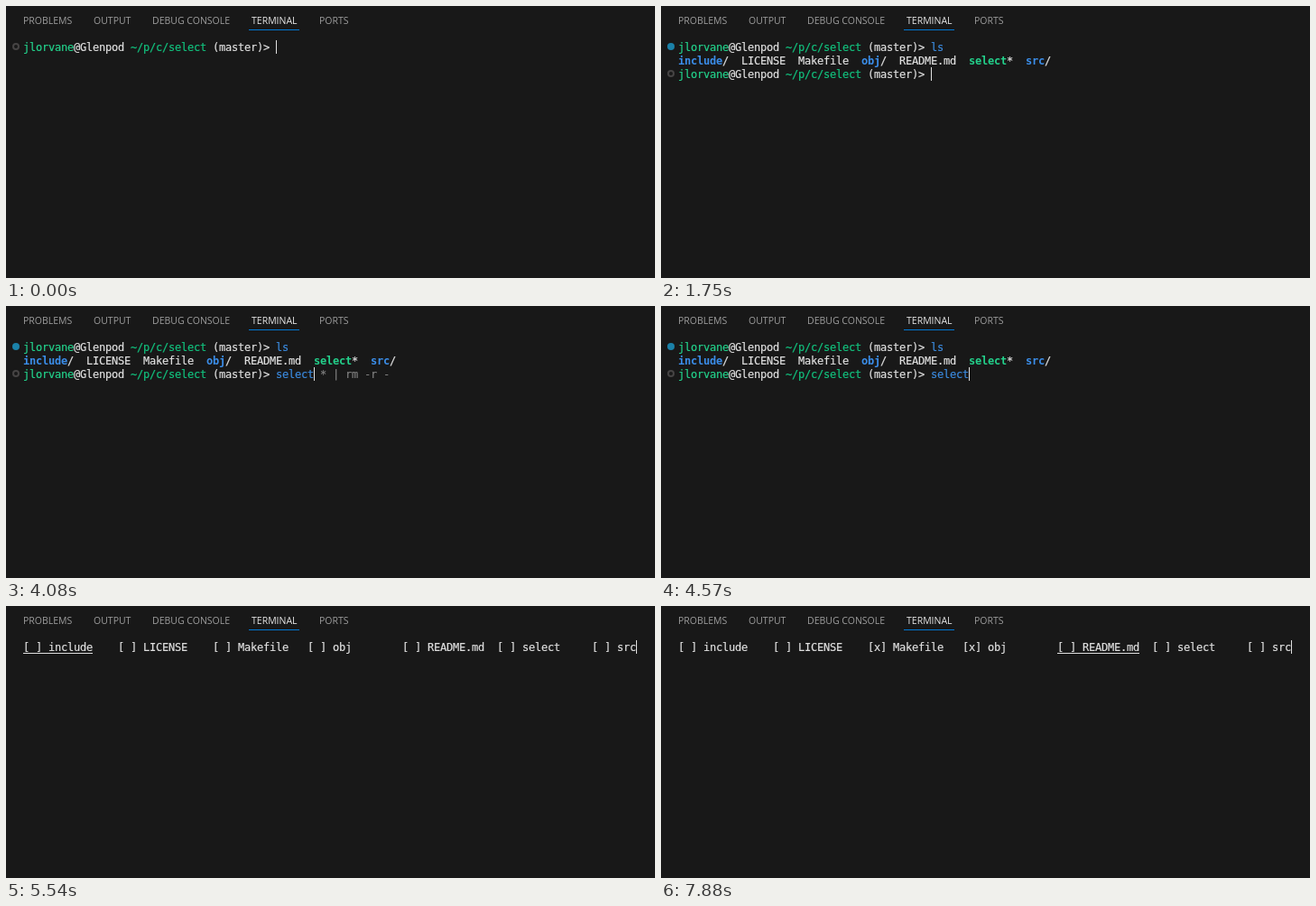
These frames come from a looping animation (719 px wide and 302 px high, 8000 ms). An HTML page:

```html
<!DOCTYPE html>
<html lang="en">
<head>
<meta charset="utf-8">
<title>Terminal file picker</title>
<style>
html, body { margin: 0; width: 100%; height: 100%; overflow: hidden; background: #181818; }
#stage { position: relative; width: 719px; height: 302px; overflow: hidden; background: #181818; }
#stage * { position: absolute; white-space: pre; }
.tab { top: 9px; color: #9d9d9d; font: 10.5px/15px "Open Sans", "Noto Sans", sans-serif; }
.tab.on { color: #e7e7e7; }
#bar { left: 269px; top: 26px; width: 56px; height: 1px; background: #0078d4; }
#screen { left: 19px; top: 38px; color: #e0e0e0;
  font: 12px/16px "DejaVu Sans Mono", monospace; letter-spacing: calc(7px - 1ch);
  -webkit-text-stroke: 0.2px; }
.user { color: #23d18b; }
.path { color: #12c27e; }
.cmd { color: #3b8ade; }
.glob { color: #29b8db; }
.bad { color: #f14c4c; }
.hint { color: #7f7f7f; }
.dir, .exe { font-weight: bold; -webkit-text-stroke: 0; }
.dir { color: #3b8eea; }
.exe { color: #23d18b; }
.caret { width: 1px; height: 15px; background: #e0e0e0; }
.line { height: 1px; background: #e0e0e0; }
.dot { left: -12px; width: 8px; height: 8px; border-radius: 50%; background: #1b81a8; }
.ring { left: -12px; width: 4px; height: 4px; border: 2px solid #464444; border-radius: 50%; }
</style>
</head>
<body>
<div id="stage">
  <span class="tab" style="left:19px">PROBLEMS</span>
  <span class="tab" style="left:97px">OUTPUT</span>
  <span class="tab" style="left:162px">DEBUG CONSOLE</span>
  <span class="tab on" style="left:272px">TERMINAL</span>
  <span class="tab" style="left:347px">PORTS</span>
  <div id="bar"></div>
  <div id="screen"></div>
</div>
<script>
const LOOP = 8000, CELL = 7, ROW = 15, INPUT = 40;
const screen = document.getElementById('screen');
const files = ['include', 'LICENSE', 'Makefile', 'obj', 'README.md', 'select', 'src'];
const kinds = { include: ['dir', '/'], obj: ['dir', '/'], src: ['dir', '/'], select: ['exe', '*'] };

function box(cls, style) {
  const el = document.createElement('span');
  el.className = cls;
  Object.assign(el.style, style);
  screen.append(el);
  return el;
}

// Writes text at a cell and returns the column after it.
function put(row, col, text, cls = '') {
  box(cls, { left: col * CELL + 'px', top: row * ROW + 'px' }).textContent = text;
  return col + text.length;
}

function caret(row, col) {
  box('caret', { left: col * CELL + 'px', top: row * ROW + 'px' });
}

function prompt(row, mark) {
  box(mark, { top: row * ROW + 3 + 'px' });
  put(row, 0, 'jlorvane', 'user');
  put(row, 8, '@Glenpod');
  put(row, 17, '~/p/c/select', 'path');
  put(row, 30, '(master)>');
}

// parts: [text, class] pairs before the caret; hint: greyed suggestion after it
function input(row, parts, hint) {
  let col = INPUT;
  for (const [text, cls] of parts) col = put(row, col, text, cls);
  if (hint) put(row, col, hint, 'hint');
  caret(row, col);
}

function listing() {
  let col = 0;
  for (const name of files) {
    const [cls, tail] = kinds[name] || ['', ''];
    col = put(1, col, name, cls);
    if (tail) col = put(1, col, tail);
    col += 2;
  }
}

function first(parts, hint) {
  prompt(0, 'ring');
  input(0, parts, hint);
}

function output() {
  prompt(0, 'ring');
  put(0, INPUT, 'ls', 'cmd');
  listing();
  caret(2, 0);
}

function second(parts, hint) {
  prompt(0, 'dot');
  put(0, INPUT, 'ls', 'cmd');
  listing();
  prompt(2, 'ring');
  input(2, parts, hint);
}

// Types the first n letters of the suggested command.
function typed(n, cls) {
  const full = 'select * | rm -r -';
  second([[full.slice(0, n), cls]], full.slice(n));
}

function menu(current, marked = []) {
  files.forEach((name, i) => {
    const col = i * 15;
    put(0, col, `[${marked.includes(i) ? 'x' : ' '}]`);
    const end = put(0, col + 4, name);
    if (i === current)
      box('line', { left: col * CELL + 'px', top: '14px', width: (end - col) * CELL + 'px' });
    if (i === files.length - 1) caret(0, end);
  });
}

const steps = [
  [0, () => first([])],
  [1220, () => first([['l', '']], 's')],
  [1260, () => first([['ls', '']])],
  [1300, () => first([['ls', 'cmd']])],
  [1710, output],
  [1750, () => second([])],
  [3360, () => typed(1, '')],
  [3400, () => typed(1, 'bad')],
  [3480, () => typed(2, 'bad')],
  [3600, () => typed(3, 'bad')],
  [3710, () => typed(4, 'bad')],
  [3920, () => typed(5, 'bad')],
  [4080, () => typed(6, 'cmd')],
  [4120, () => second([['select*', 'cmd']])],
  [4160, () => second([['select*', 'bad']])],
  [4570, () => second([['select', 'cmd']])],
  [4850, () => typed(7, 'cmd')],
  [5300, () => second([['select ', 'cmd'], ['*', 'glob']], ' | rm -r -')],
  [5540, () => menu(0)],
  [6270, () => menu(1)],
  [6430, () => menu(2)],
  [7400, () => menu(2, [2])],
  [7560, () => menu(3, [2])],
  [7760, () => menu(3, [2, 3])],
  [7880, () => menu(4, [2, 3])]
];

const start = performance.now();
let shown = -1;

function tick() {
  const t = (performance.now() - start) % LOOP;
  const now = steps.findLastIndex(([at]) => at <= t);
  if (now !== shown) {
    shown = now;
    screen.replaceChildren();
    steps[now][1]();
  }
  requestAnimationFrame(tick);
}
tick();
</script>
</body>
</html>
```
